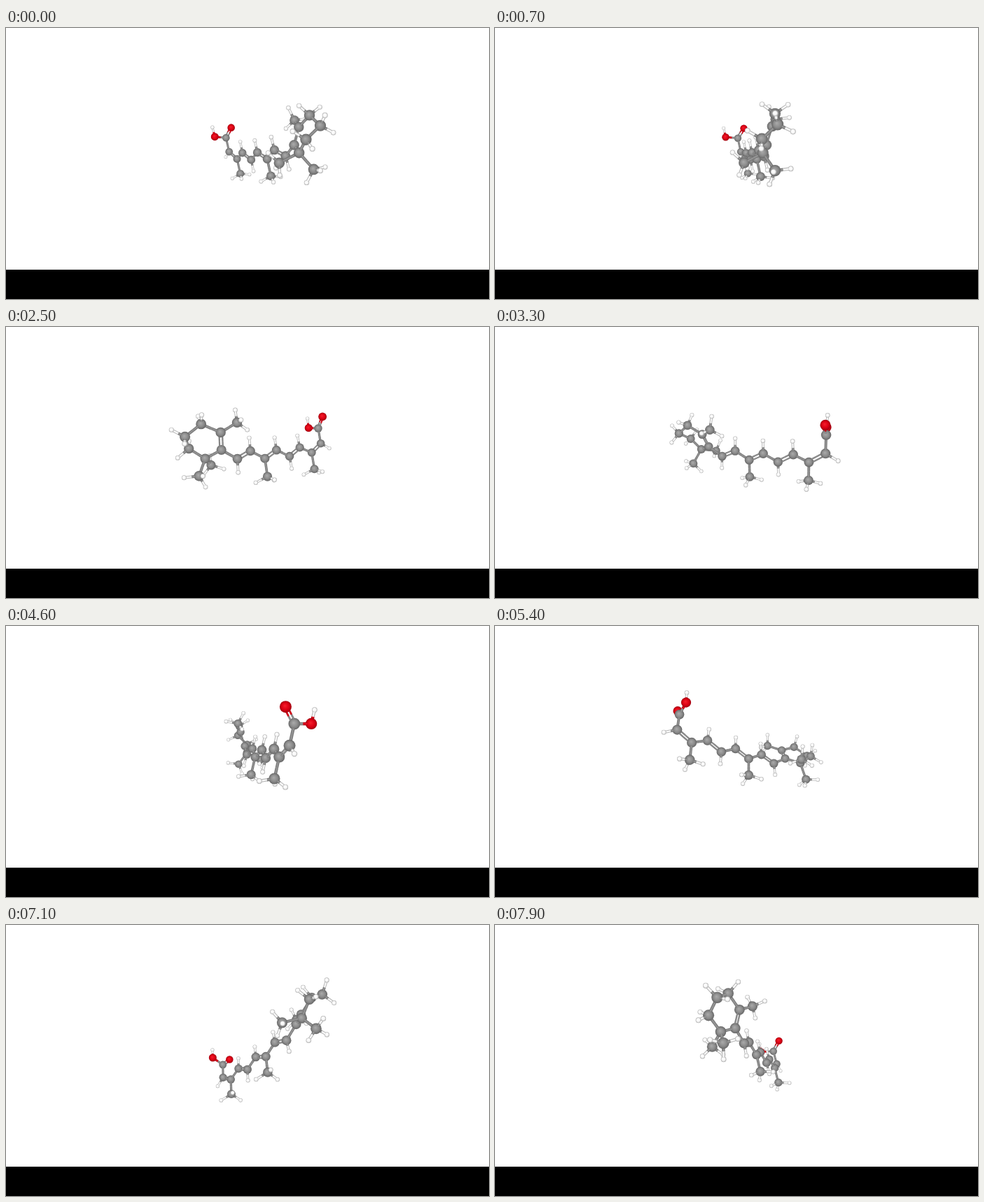
These frames come from a looping animation (690x388 px, 8 s). An HTML page with a canvas:

```html
<!DOCTYPE html>
<html lang="en">
<head>
<meta charset="utf-8">
<title>Rotating molecule</title>
<style>
html, body { margin: 0; width: 100%; height: 100%; overflow: hidden; background: #fff; }
canvas { display: block; }
</style>
</head>
<body>
<canvas id="stage" width="690" height="388"></canvas>
<script>
const ctx = document.getElementById('stage').getContext('2d');
const LOOP = 8000, STEP = 100;
const MID = [365, 173.5], SCALE = 17, CAMERA = 25;
const CENTER = [2.5, 0.95, -0.35];

// vector helpers
const add = (a, b, k = 1) => a.map((v, i) => v + b[i] * k);
const sub = (a, b) => add(a, b, -1);
const dot = (a, b) => a[0] * b[0] + a[1] * b[1] + a[2] * b[2];
const mul = (a, k) => a.map(v => v * k);
const unit = a => mul(a, 1 / Math.hypot(...a));
const cross = (a, b) => [
  a[1] * b[2] - a[2] * b[1],
  a[2] * b[0] - a[0] * b[2],
  a[0] * b[1] - a[1] * b[0]
];

// radius, sphere shades from centre to rim, bond edge and core
const KINDS = {
  C: { r: 0.38, shades: ['#ababab', '#8c8c8c', '#666666'], edge: '#767676', core: '#949494' },
  O: { r: 0.38, shades: ['#f5202c', '#dd0014', '#a0000e'], edge: '#b0000e', core: '#e01020' },
  H: { r: 0.18, shades: ['#ffffff', '#f6f6f6', '#adadad'], edge: '#b8b8b8', core: '#fbfbfb' }
};

// molecule, in angstroms
const atoms = [], bonds = [];
const atom = (kind, pos, hydrogens = 0) => atoms.push({ kind: KINDS[kind], pos, hydrogens });
const attach = (kind, base, offset, hydrogens) => atom(kind, add(atoms[base].pos, offset), hydrogens);

[0, 1, 1, 0, 1, 1, 1, 0, 1].forEach((h, i) => {
  const x = 1.24 * (i - 1);
  atom('C', [x, (i % 2 ? 0 : 0.65) + 0.013 * (x - 3.72) ** 2, 0], h);
});
[
  [-0.16, 1.23, 0.68, 0], [-1.57, 1.93, 0.59, 2], [-2.75, 1.1, 0.2, 2], [-2.25, 0.4, -0.87, 2],
  [-1.13, -0.49, -0.69, 0], [0.95, 1.79, 1.4, 3], [-1.87, -1.79, -0.34, 3], [-0.27, -0.9, -1.93, 3]
].forEach(([x, y, z, h]) => attach('C', 0, [x, y, z], h));
attach('C', 3, [0, -1.5, 0], 3);
attach('C', 7, [0, -1.5, 0], 3);
attach('C', 8, [0, 1.45, 0]);
attach('O', 19, [0, 0.9, 0.85]);
attach('O', 19, [-0.1, 0.35, -1.25]);

const DOUBLES = ['1-2', '3-4', '5-6', '7-8', '0-9', '19-20'];
const heavy = atoms.length;
const near = atoms.map((a, i) => [...Array(heavy).keys()].filter(j =>
  j !== i && Math.hypot(...sub(a.pos, atoms[j].pos)) < 1.75));

near.forEach((list, i) => list.forEach(j => {
  if (j < i) return;
  const bond = { a: i, b: j };
  if (DOUBLES.includes(i + '-' + j)) {
    const u = unit(sub(atoms[j].pos, atoms[i].pos));
    const k = near[i].find(n => n !== j) ?? near[j].find(n => n !== i);
    const side = sub(atoms[k].pos, atoms[i].pos);
    bond.shift = mul(unit(cross(u, cross(u, side))), 0.12);
  }
  bonds.push(bond);
}));

function addHydrogen(i, offset) {
  bonds.push({ a: i, b: atoms.length });
  attach('H', i, offset);
}

for (let i = 0; i < heavy; i++) {
  const { pos, hydrogens } = atoms[i];
  if (!hydrogens) continue;
  const dirs = near[i].map(j => unit(sub(atoms[j].pos, pos)));
  const away = unit(mul(dirs.reduce((s, d) => add(s, d)), -1));
  if (hydrogens === 1) addHydrogen(i, mul(away, 1.08));
  if (hydrogens === 2) {
    const n = unit(cross(dirs[0], dirs[1]));
    for (const s of [-0.88, 0.88]) addHydrogen(i, add(mul(away, 0.62), n, s));
  }
  if (hydrogens === 3) {
    const p = unit(add([0, 0, 1], away, -away[2]));
    const q = cross(away, p);
    for (let k = 0; k < 3; k++) {
      const ang = k * Math.PI * 2 / 3;
      addHydrogen(i, add(add(mul(away, 0.37), p, 1.02 * Math.cos(ang)), q, 1.02 * Math.sin(ang)));
    }
  }
}
addHydrogen(21, [0.05, 0.95, 0]);

// time, heading in degrees, sideways lean, lean towards the viewer
const KEYS = [
  [0, -126, -0.21, 0.08],
  [1500, -75.5, -0.2, -0.1],
  [2500, -29, -0.14, -0.13],
  [3300, 20, -0.03, 0.25],
  [4600, 70, 0.22, -0.08],
  [5000, 108, 0.1, -0.5],
  [5400, 148, 0, -0.5],
  [6300, 176.5, -0.03, -0.5],
  [7200, 240, -0.1, -0.56],
  [7900, 287, -0.2, -0.41]
];

function slope(i, c) {
  const a = KEYS[Math.max(i - 1, 0)], b = KEYS[Math.min(i + 1, KEYS.length - 1)];
  return (b[c] - a[c]) / (b[0] - a[0]);
}

function pose(t) {
  let i = 0;
  while (i < KEYS.length - 2 && t >= KEYS[i + 1][0]) i++;
  const a = KEYS[i], b = KEYS[i + 1], d = b[0] - a[0];
  const u = Math.min((t - a[0]) / d, 1), v = 1 - u;
  return [1, 2, 3].map(c =>
    v * v * (1 + 2 * u) * a[c] + u * u * (3 - 2 * u) * b[c] +
    d * u * v * (v * slope(i, c) - u * slope(i + 1, c)));
}

function axes(t) {
  const [deg, lean, tilt] = pose(t), ang = deg * Math.PI / 180;
  const up = [lean, Math.sqrt(1 - lean * lean - tilt * tilt), tilt];
  const head = [Math.cos(ang), 0, Math.sin(ang)];
  const along = unit(add(head, up, -dot(head, up)));
  return [along, up, cross(along, up)];
}

function project(p) {
  const s = SCALE * CAMERA / (CAMERA - p[2]);
  return [MID[0] + p[0] * s, MID[1] - p[1] * s, s];
}

function drawBall(p, kind) {
  const [x, y, s] = project(p), r = kind.r * s;
  const g = ctx.createRadialGradient(x - r * 0.15, y - r * 0.2, 0, x, y, r);
  kind.shades.forEach((c, i) => g.addColorStop([0, 0.6, 1][i], c));
  ctx.fillStyle = g;
  ctx.beginPath();
  ctx.arc(x, y, r, 0, Math.PI * 2);
  ctx.fill();
}

function drawRod(p, q, kind, width) {
  const [x1, y1, s] = project(p), [x2, y2] = project(q);
  for (const [color, k] of [[kind.edge, 1], [kind.core, 0.5]]) {
    ctx.strokeStyle = color;
    ctx.lineWidth = width * s * k;
    ctx.beginPath();
    ctx.moveTo(x1, y1);
    ctx.lineTo(x2, y2);
    ctx.stroke();
  }
}

function draw(t) {
  const [ex, ey, ez] = axes(t);
  const turn = v => add(add(mul(ex, v[0]), ey, v[1]), ez, v[2]);
  const placed = atoms.map(a => turn(sub(a.pos, CENTER)));
  const parts = placed.map((p, i) => ({ z: p[2], paint: () => drawBall(p, atoms[i].kind) }));

  for (const { a, b, shift } of bonds) {
    const u = unit(sub(placed[b], placed[a]));
    const mid = mul(add(placed[a], placed[b]), 0.5);
    const lines = shift ? [turn(shift), turn(mul(shift, -1))] : [[0, 0, 0]];
    for (const [i, sign] of [[a, 1], [b, -1]]) {
      const kind = atoms[i].kind;
      const start = add(placed[i], u, sign * kind.r * 0.8);
      for (const off of lines) {
        const p = add(start, off), q = add(mid, off);
        parts.push({ z: (p[2] + q[2]) / 2, paint: () => drawRod(p, q, kind, shift ? 0.12 : 0.21) });
      }
    }
  }

  ctx.fillStyle = '#fff';
  ctx.fillRect(0, 0, 690, 388);
  parts.sort((m, n) => m.z - n.z).forEach(part => part.paint());
  ctx.fillStyle = '#000';
  ctx.fillRect(0, 346, 690, 42);
}

function tick() {
  const t = performance.now() % LOOP;
  draw(Math.floor(t / STEP) * STEP);
  requestAnimationFrame(tick);
}
tick();
</script>
</body>
</html>
```
